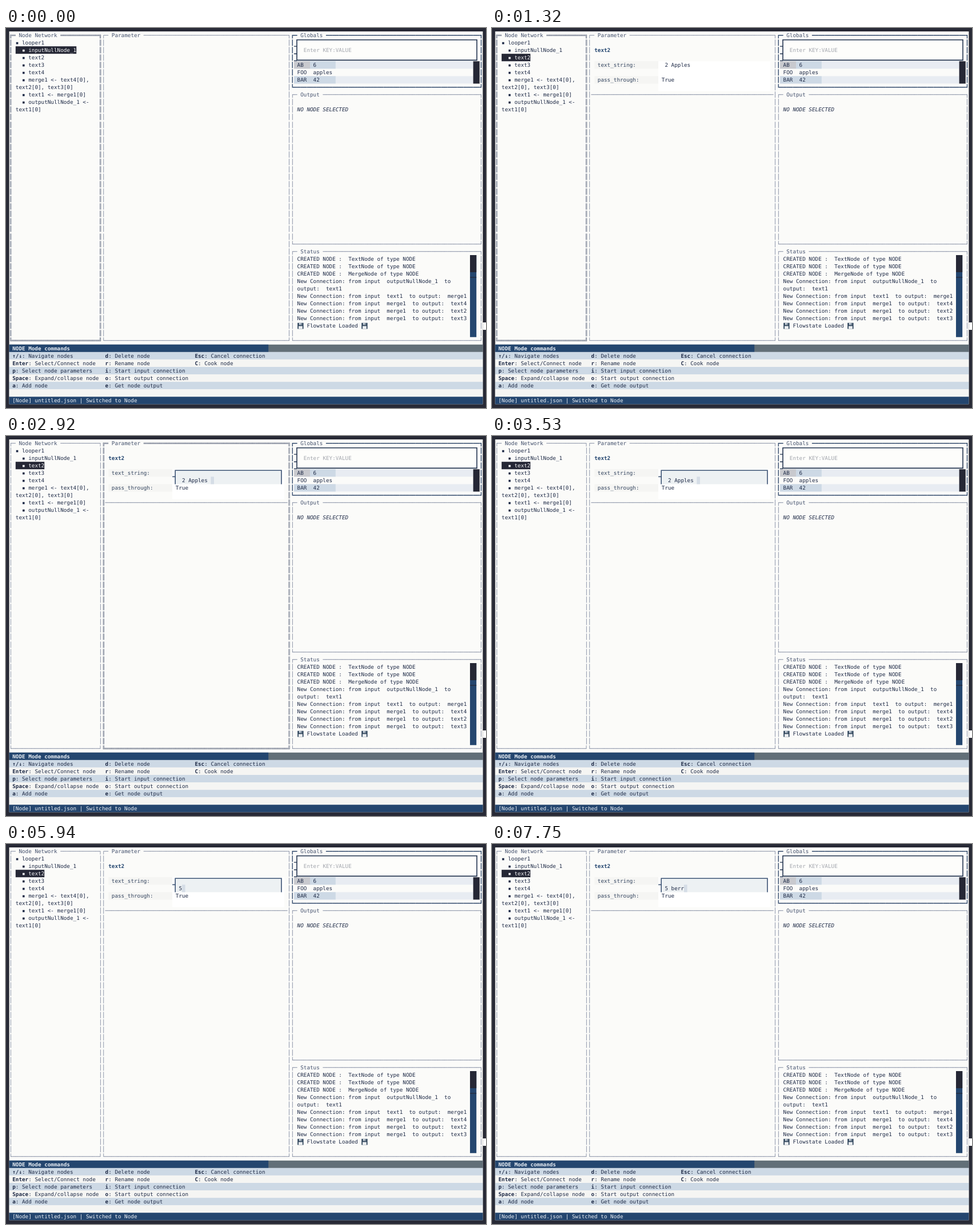
Animation, 840 px wide and 666 px high, one loop 7990 ms. Source, as an HTML page:

```html
<!DOCTYPE html>
<html lang="en">
<head>
<meta charset="utf-8">
<title>Node editor terminal</title>
<style>
  html, body { margin: 0; width: 100%; height: 100%; overflow: hidden; background: #282a36; }
  svg { display: block; }
  text {
    font: 9.302px "DejaVu Sans Mono", monospace;
    white-space: pre;
    text-rendering: geometricPrecision;
    fill: #1f2b47;
  }
</style>
</head>
<body>
<svg id="stage" width="840" height="666" viewBox="0 0 840 666"></svg>
<script>
const CELL_W = 5.6, CELL_H = 5.6 * 7 / 3, LEFT = 5.6, TOP = 6, LOOP = 7990;
const COLS = 148;
const INK = '#1f2b47', NAVY = '#24466f', DARK = '#252735', PALE = '#cdd9e5', PAPER = '#fbfbf9', SOFT = '#f5f5f3';
const STRIPE = '#e8ecf2', EDGE = '#233450';
const LIGHT = '┌─┐│└┘', HEAVY = '┏━┓┃┗┛', DOUBLE = '╔═╗║╚╝';
const stage = document.getElementById('stage');
const x = col => LEFT + col * CELL_W;
const y = row => TOP + row * CELL_H;

function add(tag, attrs, parent = stage) {
  const node = document.createElementNS('http://www.w3.org/2000/svg', tag);
  for (const key in attrs) node.setAttribute(key, attrs[key]);
  parent.appendChild(node);
  return node;
}
const group = () => add('g', {});
const show = (node, visible) => node.setAttribute('visibility', visible ? 'visible' : 'hidden');

function box(x0, y0, x1, y1, fill, parent) {
  return add('rect', { x: x0, y: y0, width: x1 - x0, height: y1 - y0, fill }, parent);
}
function cells(col, row, cols, rows, fill, parent) {
  return box(x(col), y(row), x(col + cols), y(row + rows), fill, parent);
}
function line(d, color, width, parent) {
  return add('path', { d, fill: 'none', stroke: color, 'stroke-width': width }, parent);
}
function write(col, row, string, color = INK, parent = stage, style = '') {
  const node = add('text', { x: x(col), y: y(row) + 9.75, style: `fill:${color};${style}` }, parent);
  node.textContent = string;
  return node;
}

// A bordered panel made of box-drawing characters
function panel(c0, r0, c1, r1, title, glyphs, color, titleColor = '#46536f') {
  const g = group(), [tl, h, tr, v, bl, br] = glyphs;
  const inner = c1 - c0 - 1, used = title.length + 3;
  write(c0, r0, tl + h, color, g);
  write(c0 + 3, r0, title, titleColor, g);
  write(c0 + 1 + used, r0, h.repeat(inner - used) + tr, color, g);
  for (let r = r0 + 1; r < r1; r++) {
    write(c0, r, v, color, g);
    write(c1, r, v, color, g);
  }
  write(c0, r1, bl + h.repeat(inner) + br, color, g);
  return g;
}

function floppy(col, row) {
  const left = x(col) + .6, top = y(row) + 1.2;
  box(left, top, left + 10.4, top + 10.6, '#34495f');
  box(left + 2.6, top, left + 7.8, top + 3.6, '#c9d2da');
  box(left + 5.8, top + .6, left + 7, top + 3, '#34495f');
  box(left + 1.8, top + 5.6, left + 8.6, top + 10.6, '#eef1f3');
}

cells(0, 0, COLS, 50, PAPER);
box(x(COLS), 516, 840, 529, '#ffffff');

// Panels
const lightColor = '#66718c', doubleColor = '#59637a';
const nodeLight = panel(0, 0, 28, 41, 'Node Network', LIGHT, lightColor);
const nodeDouble = panel(0, 0, 28, 41, 'Node Network', DOUBLE, doubleColor);
const paramLight = panel(29, 0, 87, 41, 'Parameter', LIGHT, lightColor);
const paramDouble = panel(29, 0, 87, 41, 'Parameter', DOUBLE, doubleColor);
panel(88, 0, 147, 7, 'Globals', HEAVY, '#3b5273');
panel(88, 8, 147, 28, 'Output', LIGHT, lightColor);
panel(88, 29, 147, 41, 'Status', LIGHT, lightColor);

// Node tree
const firstMark = cells(2, 2, 19, 1, DARK), secondMark = cells(2, 3, 9, 1, DARK);
write(2, 1, '▪ looper1');
const treeRows = [
  '  ▪ inputNullNode_1', '  ▪ text2', '  ▪ text3', '  ▪ text4', '  ▪ merge1 <- text4[0],',
  'text2[0], text3[0]', '  ▪ text1 <- merge1[0]', '  ▪ outputNullNode_1 <-', 'text1[0]'
].map((s, i) => write(2, 2 + i, s));

// Globals
cells(89, 1, 58, 3, PAPER);
box(509, 20.8, 824, 56.4, '#fdfdfb');
line('M509 20.8H824V56.4H509Z', EDGE, 1.6);
line(`M${x(89)} ${y(2)}H509M${x(89)} ${y(3)}H509M${x(89)} 57.4H509`, EDGE, 1.4);
write(92, 2, 'Enter KEY:VALUE', '#a3a6ad');
cells(89, 4, 56, 1, STRIPE);
cells(89, 4, 5, 1, '#c8c9ce');
cells(94, 4, 8, 1, PALE);
cells(89, 6, 56, 1, STRIPE);
cells(89, 6, 13, 1, PALE);
cells(145, 4, 2, 3, DARK);
['AB   6', 'FOO  apples', 'BAR  42'].forEach((s, i) => write(90, 4 + i, s));

// Output and status
write(90, 10, 'NO NODE SELECTED', INK, stage, 'font-style:italic');
[
  'CREATED NODE :  TextNode of type NODE',
  'CREATED NODE :  TextNode of type NODE',
  'CREATED NODE :  MergeNode of type NODE',
  'New Connection: from input  outputNullNode_1  to',
  'output:  text1',
  'New Connection: from input  text1  to output:  merge1',
  'New Connection: from input  merge1  to output:  text4',
  'New Connection: from input  merge1  to output:  text2',
  'New Connection: from input  merge1  to output:  text3',
  '   Flowstate Loaded'
].forEach((s, i) => write(90, 30 + i, s));
floppy(90, 39);
floppy(110, 39);
cells(144, 30, 2, 11, NAVY);
box(x(144), y(30), x(146), 428, DARK);
box(x(144), 436.4, x(146), 437.6, DARK);

// Command help
cells(0, 42, COLS, 1, '#626f78');
cells(0, 42, 81, 1, NAVY);
write(1, 42, 'NODE Mode commands', '#e9eff5', stage, 'font-weight:bold');
const helpColumns = [
  [1, ['↑/↓: Navigate nodes', 'Enter: Select/Connect node', 'p: Select node parameters', 'Space: Expand/collapse node', 'a: Add node']],
  [30, ['d: Delete node', 'r: Rename node', 'i: Start input connection', 'o: Start output connection', 'e: Get node output']],
  [58, ['Esc: Cancel connection', 'C: Cook node']]
];
for (let r = 43; r < 49; r++) cells(0, r, COLS, 1, r % 2 ? PALE : SOFT);
for (const [col, entries] of helpColumns) entries.forEach((entry, i) => {
  const split = entry.indexOf(':');
  write(col, 43 + i, entry.slice(0, split), INK, stage, 'font-weight:bold');
  write(col + split, 43 + i, entry.slice(split));
});
cells(0, 49, COLS, 1, NAVY);
write(1, 49, '[Node] untitled.json | Switched to Node', '#edf2f7');

// Parameter form
const form = group();
write(31, 2, 'text2', NAVY, form, 'font-weight:bold');
cells(31, 4, 20, 1, SOFT, form);
cells(31, 6, 20, 1, SOFT, form);
cells(51, 4, 35, 4, '#ffffff', form);
write(32, 4, 'text_string:', '#34455f', form);
write(32, 6, 'pass_through:', '#34455f', form);
write(52, 6, 'True', INK, form);
write(30, 8, '─'.repeat(57), lightColor, form);
const idleValue = write(53, 4, '2 Apples');

const editor = group();
box(296.2, 60, 482, y(6), '#edf1f3', editor);
line(`M296.2 ${y(6)}V60.2H482V${y(6)}`, '#3b5273', 1.6, editor);
line(`M${x(51)} ${y(5)}H296.2`, '#3b5273', 1.6, editor);
const cursor = cells(53, 5, 1, 1, '#d5dde6', editor);
const editText = write(53, 5, '', INK, editor);

const START = ' 2 Apples ';
const typed = [
  [5940, '5'], [6220, '5 '], [6540, '5 b'], [6790, '5 be'], [6940, '5 ber'],
  [6990, '5 beri'], [7530, '5 ber'], [7750, '5 berr']
];

function valueAt(t) {
  if (t < 4180) return START;
  if (t < 4740) return START.slice(0, 9);
  if (t < 5940) return START.slice(0, Math.max(0, 8 - Math.floor((t - 4740) / 42.5)));
  return typed.filter(([at]) => t >= at).pop()[1];
}

function render(t) {
  const moved = t >= 340, editing = t >= 2920;
  show(firstMark, !moved);
  show(secondMark, moved);
  treeRows[0].style.fill = moved ? INK : '#f4f5f7';
  treeRows[1].style.fill = moved ? '#f4f5f7' : INK;

  const paramFocus = t >= 2390 && t < 3530;
  show(nodeDouble, t < 2390);
  show(nodeLight, t >= 2390);
  show(paramDouble, paramFocus);
  show(paramLight, !paramFocus);

  show(form, t >= 1320);
  show(idleValue, t >= 1320 && !editing);
  show(editor, editing);
  const value = valueAt(t);
  editText.textContent = value;
  cursor.setAttribute('x', x(53 + value.length));
}

const start = performance.now();
function tick() {
  render((performance.now() - start) % LOOP);
  requestAnimationFrame(tick);
}
render(0);
requestAnimationFrame(tick);
</script>
</body>
</html>
```
